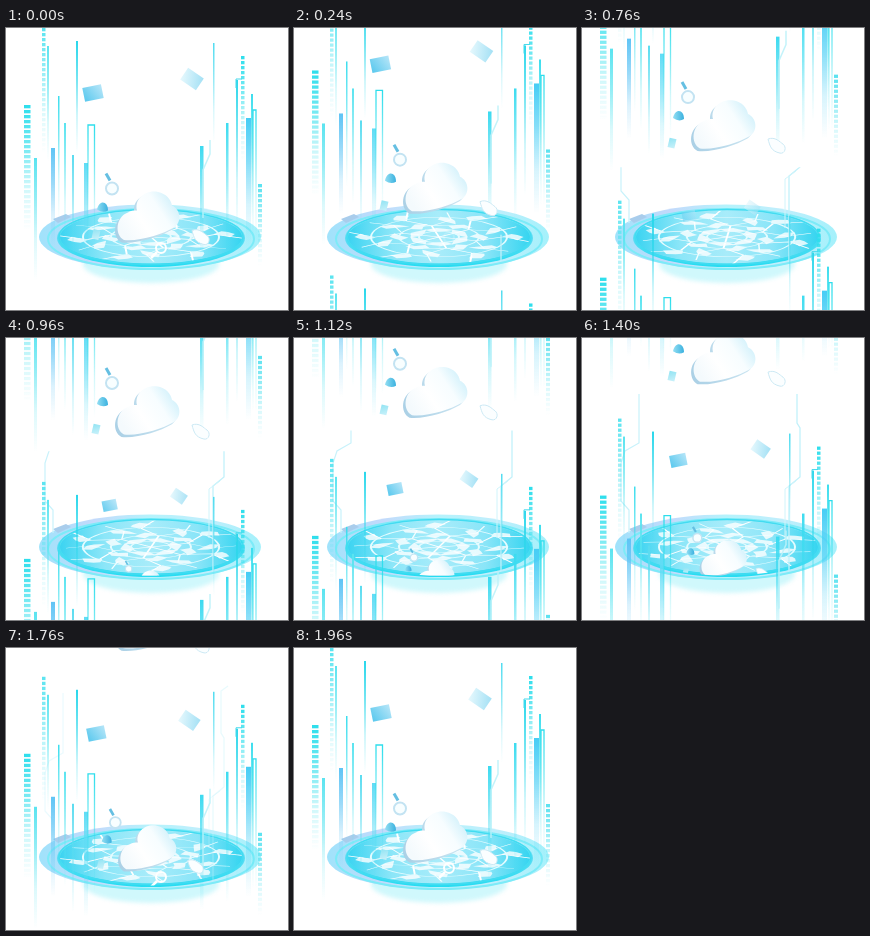
An HTML page with a canvas for the animation above (2000 ms loop, 282x282 px).

```html
<!DOCTYPE html>
<html>
<head>
<meta charset="utf-8">
<style>
html, body { margin: 0; width: 100%; height: 100%; overflow: hidden; background: #fff; }
canvas { display: block; width: 282px; height: 282px; }
</style>
</head>
<body>
<canvas id="stage" width="282" height="282"></canvas>
<script>
const c = document.getElementById('stage').getContext('2d');
const SIZE = 282, LAST = 49, TAU = Math.PI * 2;
const CX = 145, CY = 209;
const clamp = v => Math.max(0, Math.min(1, v));

// x, top, width, length, kind (s solid, d dashed, o outlined), colour
const bars = [
  [18, 77, 6.5, 125, 'd', '45,222,236'], [28, 130, 3, 122, 's', '90,228,240'],
  [36, 0, 3.5, 125, 'd', '90,228,240'], [41, 18, 2, 115, 's', '90,228,240'],
  [45, 120, 4, 100, 's', '95,196,245'], [52, 68, 1.5, 125, 's', '60,222,238'],
  [58, 95, 2, 115, 's', '90,228,240'], [66, 127, 2, 108, 's', '90,220,240'],
  [70, 13, 2, 112, 's', '40,215,235'], [78, 135, 4, 105, 's', '95,220,245'],
  [82, 97, 6.5, 120, 'o', '45,222,236'], [194, 118, 3.5, 115, 's', '60,218,240'],
  [207, 15, 1.5, 100, 's', '80,220,240'], [220, 95, 2.5, 130, 's', '60,220,240'],
  [230, 52, 2, 150, 's', '45,215,235'], [235, 28, 3.5, 105, 'd', '45,222,236'],
  [240, 90, 5, 130, 's', '70,205,245'], [245, 66, 2, 125, 's', '60,222,238'],
  [247, 82, 3, 130, 'o', '45,222,236'], [252, 156, 4, 82, 'd', '90,226,240']
];

function gradient(x0, y0, x1, y1, ...stops) {
  const g = c.createLinearGradient(x0, y0, x1, y1);
  stops.forEach((s, i) => g.addColorStop(i / (stops.length - 1), s));
  return g;
}

function line(color, width, ...p) {
  c.beginPath();
  for (let i = 0; i < p.length; i += 2) c.lineTo(p[i], p[i + 1]);
  c.strokeStyle = color;
  c.lineWidth = width;
  c.stroke();
}

function oval(x, y, rx, ry, fill, stroke, width = 1) {
  c.beginPath();
  c.ellipse(x, y, rx, ry, 0, 0, TAU);
  if (fill) { c.fillStyle = fill; c.fill(); }
  if (stroke) { c.strokeStyle = stroke; c.lineWidth = width; c.stroke(); }
}

function scoped(draw) {
  c.save();
  draw();
  c.restore();
}

function disc(f) {
  scoped(() => {
    c.filter = 'blur(2px)';
    oval(CX, 236, 68, 19, '#d0f8fc');
  });
  oval(CX - 1, CY, 111, 32.5, gradient(32, 0, 256, 0, '#9fe3fb', '#c3d9fb', '#b5f3fc', '#c0eefc', '#a4f1fb'));
  oval(CX, CY + 2, 103, 30, null, '#7cebf8', 2);
  oval(CX, CY + 1, 94, 29, gradient(0, 180, 0, 240, '#b9effb', '#58dcf4', '#25dcf1'));
  scoped(() => {
    c.beginPath();
    c.ellipse(CX, CY, 91, 26.5, 0, 0, TAU);
    c.clip();
    c.fillStyle = gradient(52, 0, 238, 0, '#38d3f1', '#8ce6f8', '#a8ecfa', '#8ae5f8', '#32d4f0');
    c.fillRect(50, 180, 190, 60);
    c.translate(CX, CY);
    c.scale(1, .29);
    c.rotate(f / LAST * TAU / 6);
    for (let i = 0; i < 6; i++) {
      c.rotate(TAU / 6);
      c.fillStyle = 'rgba(255,255,255,.8)';
      for (let j = 0; j < 4; j++) {
        const r = 24 + j * 17, a = Math.sin(j * 5 + 1) * .5;
        c.beginPath();
        for (let k = 0; k < 6; k++) {
          const d = 8 + 4 * Math.sin(k * 4 + j * 3), b = k * TAU / 6;
          c.lineTo(r * Math.cos(a) + d * Math.cos(b), r * Math.sin(a) + d * 1.4 * Math.sin(b));
        }
        c.fill();
      }
      line('#fff', 2, 0, 0, 38, 8, 64, -9, 95, 6);
      line('#f4feff', 1.5, 38, 8, 50, 34, 75, 40);
    }
    [20, 40, 68].forEach(r => oval(0, 0, r, r, null, '#e5fcff', 2));
  });
  oval(CX, CY, 92, 27.5, null, '#42dcf1', 1.5);
  c.fillStyle = '#a9cdec';
  c.beginPath();
  [[47, 191], [60, 186], [65, 189], [52, 195]].forEach(p => c.lineTo(...p));
  c.fill();
}

function circuits(f) {
  scoped(() => {
    c.globalAlpha = clamp((47 - f) / 8);
    c.beginPath();
    c.rect(0, 238 - 5.2 * f, SIZE, SIZE);
    c.clip();
    line('#c2f1fa', 1.3, 207, 232, 207, 148, 218, 139, 218, 90, 215, 85, 215, 43, 222, 38);
    line('#d0f4fb', 1, 203, 200, 203, 151, 214, 143);
    line('#c8f2fb', 1.2, 47, 195, 47, 172, 39, 163, 39, 125, 43, 113, 57, 105, 57, 45);
  });
}

function bar([x, y, w, h, kind, rgb]) {
  const paint = gradient(0, y, 0, y + h, `rgba(${rgb},1)`, `rgba(${rgb},.65)`, `rgba(${rgb},.22)`, `rgba(${rgb},0)`);
  c.fillStyle = paint;
  if (kind === 's') c.fillRect(x, y, w, h);
  else if (kind === 'd') for (let d = 0; d < h; d += 5) c.fillRect(x, y + d, w, 3.3);
  else line(paint, 1.3, x, y + h, x, y, x + w, y, x + w, y + h);
}

function scrollBars(f) {
  const shift = f / LAST * SIZE;
  for (const dy of [-shift, SIZE - shift]) scoped(() => {
    c.translate(0, dy);
    bars.forEach(bar);
    line('rgba(190,242,250,.9)', 1.5, 204, 112, 204, 126, 197, 142, 197, 190);
    line('#45d9eb', 1, 230, 60, 230, 51, 236, 51);
  });
}

function card(x, y, angle, s, from, to) {
  scoped(() => {
    c.translate(x, y);
    c.rotate(angle);
    c.scale(s, s);
    c.fillStyle = gradient(-10, 5, 10, -5, from, to);
    c.fillRect(-9.5, -7, 19, 14);
  });
}

function cards(e) {
  if (e < 13) return;
  const u = (e - 28) / 21, late = Math.max(0, e - LAST);
  const s = Math.min(1, .8 + .2 * u), v = Math.min(1, u);
  scoped(() => {
    c.globalAlpha = clamp((e - 13) / 12);
    card(101 - 14 * v - late * .1, 151 - 86 * v - late * 4.8, -.2, s, '#5bc9ee', '#b5e5f8');
    card(175 + 11 * v + late * .25, 141 - 90 * v - late * 4.6, .6, s, '#e5f8fd', '#a5e1f5');
  });
}

function cloudPath() {
  c.beginPath();
  c.moveTo(-24, 23.5);
  c.bezierCurveTo(-34, 18, -32, 0, -20, -4);
  c.bezierCurveTo(-17, -6, -14, -6, -11, -6);
  c.bezierCurveTo(-14, -18, -2, -27, 10, -24.5);
  c.bezierCurveTo(18, -23, 23, -17, 24, -11);
  c.bezierCurveTo(33, -7, 34, 6, 26, 11);
  c.bezierCurveTo(14, 18, -8, 25, -24, 23.5);
}

function icons(y, s) {
  scoped(() => {
    c.beginPath();
    c.rect(0, -80, SIZE, CY + 80);
    c.ellipse(CX, CY, 94, 28.5, 0, 0, TAU);
    c.clip();
    c.translate(141, y);
    c.scale(s, s);
    scoped(() => {
      c.translate(-1.5, 1.5);
      cloudPath();
      c.fillStyle = gradient(-32, 20, 20, 0, '#a9cfe5', '#c8e3f0');
      c.fill();
    });
    scoped(() => {
      c.translate(1, -1);
      cloudPath();
      c.fillStyle = gradient(-25, 15, 28, -20, '#f4fafd', '#ffffff', '#f7fdff', '#c9eefa');
      c.fill();
    });
    line('#65bfe2', 3, -41, -44, -37, -37);
    oval(-35, -29, 6, 6, '#f8feff', '#c3e3f2', 2);
    c.fillStyle = gradient(-50, 0, -39, 0, '#93dff3', '#3bb1df');
    c.beginPath();
    c.moveTo(-50, -8);
    c.bezierCurveTo(-48, -18, -39, -17, -39, -7);
    c.quadraticCurveTo(-44, -4, -50, -8);
    c.fill();
    card(-51, 17, 1.8, .5, '#93e4f3', '#c9f1fa');
    c.beginPath();
    c.moveTo(45, 13);
    c.bezierCurveTo(52, 10, 57, 16, 60, 18);
    c.bezierCurveTo(64, 21, 62, 28, 57, 27);
    c.bezierCurveTo(48, 25, 47, 20, 45, 13);
    c.fillStyle = '#fbfeff';
    c.fill();
    c.strokeStyle = '#cce9f4';
    c.lineWidth = 1;
    c.stroke();
  });
}

function lens(e) {
  if (e < 38 || e > 56) return;
  scoped(() => {
    c.beginPath();
    c.ellipse(CX, CY, 94, 28.5, 0, 0, TAU);
    c.clip();
    c.globalAlpha = clamp((56 - e) / 6);
    const y = 220 + (LAST - e) * 1.8;
    oval(155, y, 5, 5, null, '#fff', 2);
    line('#fff', 2.5, 151, y + 4, 145, y + 10);
  });
}

function draw(now) {
  const f = Math.min(LAST, Math.floor(now % 2000 / 40));
  c.clearRect(0, 0, SIZE, SIZE);
  disc(f);
  circuits(f);
  scrollBars(f);
  cards(f);
  cards(f + LAST);
  lens(f);
  lens(f + LAST);
  const u = (f - 28) / 21;
  if (f > 20) icons(237 - 47.5 * u, .6 + .4 * u);
  if (f < LAST) icons(189.5 - 4.81 * f, 1);
}

const start = performance.now();
function tick() {
  draw(performance.now() - start);
  requestAnimationFrame(tick);
}
tick();
</script>
</body>
</html>
```
